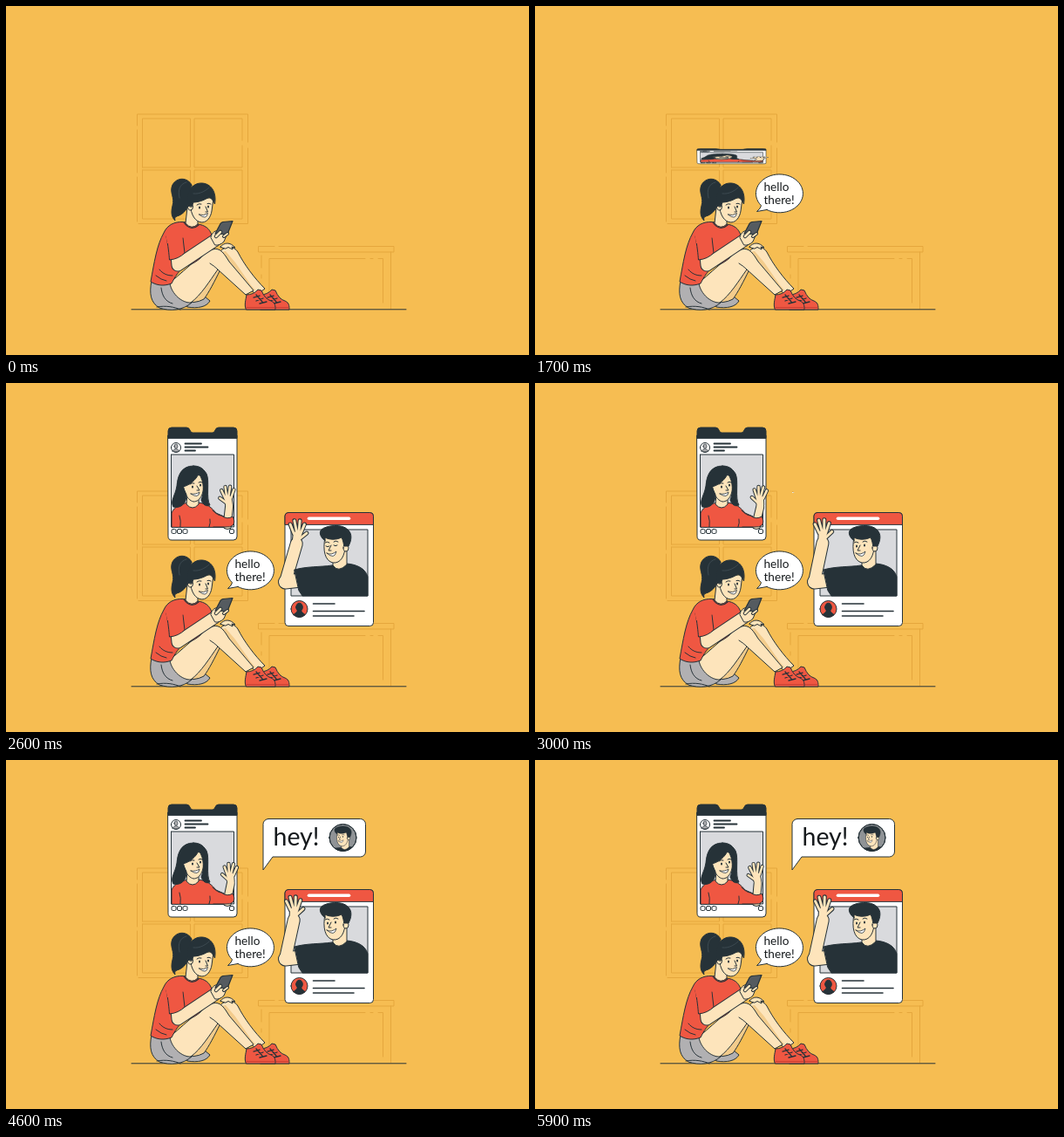
Recreate the animation shown at these times as an HTML page with a canvas. Size 600 by 400 pixels, loop 6000 ms.

```html
<!DOCTYPE html>
<html lang="en">
<head>
<meta charset="utf-8">
<title>Video chat</title>
<style>
  html, body { margin: 0; width: 100%; height: 100%; overflow: hidden; background: #f6bd52; }
  canvas { display: block; }
</style>
</head>
<body>
<canvas id="stage" width="600" height="400"></canvas>
<script>
const ctx = document.getElementById('stage').getContext('2d');
const BG = '#f6bd52', FAINT = '#e5a73d', INK = '#263238', RED = '#ef5742', DEEP_RED = '#cb3f33',
      SKIN = '#fde4bb', SHADE = '#f3cc8c', GREY = '#b1b0b2', PHOTO = '#d9dadd', WHITE = '#fff';
const LOOP = 6000, STEP = 100;
ctx.lineCap = ctx.lineJoin = 'round';

function line(d, color = INK, width = 1) {
  ctx.strokeStyle = color;
  ctx.lineWidth = width;
  ctx.stroke(new Path2D(d));
}

function shape(d, fill, stroke = INK, width = 1) {
  ctx.fillStyle = fill;
  ctx.fill(new Path2D(d));
  if (stroke) line(d, stroke, width);
}

const box = (x, y, w, h, r = 0) =>
  `M${x + r} ${y}h${w - 2 * r}a${r} ${r} 0 0 1 ${r} ${r}v${h - 2 * r}a${r} ${r} 0 0 1 ${-r} ${r}` +
  `h${2 * r - w}a${r} ${r} 0 0 1 ${-r} ${-r}v${2 * r - h}a${r} ${r} 0 0 1 ${r} ${-r}z`;
const oval = (x, y, rx, ry = rx) =>
  `M${x - rx} ${y}a${rx} ${ry} 0 1 1 ${2 * rx} 0a${rx} ${ry} 0 1 1 ${-2 * rx} 0z`;

function limb(d, width) {
  line(d, INK, width + 2);
  line(d, SKIN, width);
}

function text(str, x, y, size) {
  ctx.fillStyle = '#15191c';
  ctx.font = `${size}px Lato, sans-serif`;
  ctx.fillText(str, x, y);
}

function eye(x, y, closed) {
  if (closed) line(`M${x - 2} ${y}q2 1.6 4 0`);
  else shape(oval(x, y, 1, 1.5), INK, null);
}

// Draws a part scaled around a fixed point.
function scaled(x, y, sx, sy, draw) {
  if (sx <= 0 || sy <= 0) return;
  ctx.save();
  ctx.translate(x, y);
  ctx.scale(sx, sy);
  ctx.translate(-x, -y);
  draw();
  ctx.restore();
}

const FINGERS = 'M-3 -11L-7 -21M0 -13L-2.5 -25M2.5 -13L3.5 -25M4 -10L8.5 -21M3 -5L11 -11.5';

function wavingArm({ elbow: [x, y], shoulder, wrist: [wx, wy], width, size, flip, angle }) {
  for (const [color, rim] of [[INK, 2], [SKIN, 0]]) {
    line(`M${x} ${y}L${shoulder}`, color, width + rim);
    ctx.save();
    ctx.translate(x, y);
    ctx.rotate(angle);
    line(`M0 0L${wx} ${wy}`, color, width - 2 + rim);
    ctx.translate(wx, wy);
    ctx.scale(flip * size, size);
    line('M0 -3L.7 -9.500', color, 8.5 + rim);
    line(FINGERS, color, 2.8 + rim);
    ctx.restore();
  }
}

function room() {
  shape('M0 0H600V400H0z', BG, null);
  line('M150.5 137V124H277.5V156M277.5 163V249.5H222M216 249.5H152M150.5 247V196M150.5 191V142', FAINT);
  line('M156.5 185V129H211.5V185H156.5M271 160V185H216V129H271V154M156.5 188H211.5V244H156.5V188' +
       'M216 205V188H271V244H232M225 244H216V211', FAINT);
  line('M313 275.5H445V282H289.5V275.5H308M293 286V300M293 308V312M293 320V347M302 347V289.5H412' +
       'M418 289.5H421M427 289.5H432.5V340M441.5 282V347', FAINT);
  line('M144 347.8H459');
}

function shoe() {
  shape('M276 331Q284 331 289 325L293 326Q297 336 304 338C309 340 309 344 309 348H275.500' +
        'C273 343 275 337 276 331z', RED);
  line('M276 345.500H308', DEEP_RED);
  line('M284 334l7 -2M287 338l8 -3M291 341l8 -2M287 331l7 8', INK, 1.3);
}

function sitter(closed) {
  // legs, shorts and shoes
  shape('M209 341L228 333L234 338C230 345 220 347 208 345z', GREY);
  shape('M200 338L236 292L246 302C239 316 233 328 227 336Q216 342 205 338z', SHADE);
  shape('M246 281C252 274 262 275 266 282C273 296 285 312 297 324L287 331L256 302z', SKIN);
  shape('M247 282L252 281L263 294L281 320L287 327L280 324L255 294z', SHADE, null);
  ctx.save();
  ctx.translate(16, 0);
  shoe();
  ctx.restore();
  shape('M187 318C204 304 224 284 237 279C246 276 251 285 256 293L284 326L275 331L243 302' +
        'C233 316 224 331 212 340C204 345 192 343 186 334z', SKIN);
  line('M243 302C240 299 237 297 234 295');
  shoe();
  shape('M167 315C164 330 166 340 176 346C188 350 203 349 213 340C202 341 190 330 188 318z', GREY);
  line('M178 323C179 332 183 339 191 341M173 345C183 343 194 345 200 348');

  // body
  shape('M203 247.500C193 247 185 251 181 260C173 274 170 294 166 316C174 321 182 321 190 318' +
        'C194 310 198 303 207 298C220 294 230 284 232 276L236 263C234 255 228 251 220 250z', RED);
  shape('M208 280C218 281 228 276 233 270L230 281C222 289 213 293 203 294z', DEEP_RED, null);
  line('M176 302C180 307 185 309 191 309M172 309Q178 314 184 315');
  limb('M196 286L197 297L239 269', 13);
  shape('M184 264C186 275 187 284 187.500 291Q198 290 205 283L203 266', RED);
  shape('M183 261L202 261L202.500 272L185 272z', RED, null);

  // head
  shape('M213 205C208 196 196 196 191 205C187 214 194 219 191 229C189 237 190 242 194 246' +
        'C193 243 194 242 196 241C204 239 210 231 211 222z', INK);
  line('M207 202C199 204 197 211 199 220', '#46545b', .7);
  shape('M208 231L206 249Q213 257 220 250L220 240z', SKIN);
  line('M204 248Q212 259 221 251', INK, 1.2);
  shape('M211 222C211 236 215 245 222 247.500C230 250 235 242 236 235L238 220z', SKIN);
  shape(oval(211.5, 230, 3, 4), SKIN);
  shape('M209 229C206 214 213 203 224 203C235 203 242 213 239.500 227' +
        'C238 223 236 221 233 219C227 223 220 225 215 225L213 230z', INK);
  line('M215 215C223 216 230 211 233 208', '#46545b', .7);
  eye(222, 231, closed);
  eye(232, 230, closed);
  line('M219 228Q221 226 224 227M231 226.500Q233 225.500 235 227M229 230L231.500 236H229');
  shape('M221.500 239Q227 241 231.500 237.500Q230 246 221.500 239z', WHITE, INK, .8);

  // hands and handset
  shape('M246 276C250 271 257 270 263 277L259 276L260 279L255 276.500L252 278z', SKIN);
  shape('M235 265C236 259 241 257 245 257L254 258Q257 260 253 263L250 270Q245 275 240 274z', SKIN);
  shape('M240 261L246 249.500Q247 248 249 247.500L260 246.500L255 259Q254 261 252 261.500z', '#555b60', INK, 1.2);
  limb('M241 264L246 259', 2.5);
  limb('M250 264L254 261', 2);
}

function greeting() {
  shape('M266 233.500L254.500 235.500Q259 232 259.500 228.800A27 22 0 1 1 266 233.500z', WHITE);
  text('hello', 262.5, 212, 13.6);
  text('there!', 262.5, 227, 13.6);
}

function phoneCall(closed, wave) {
  shape('M186 60H265V176Q265 180 261 180H190Q186 180 186 176z', WHITE);
  shape('M186 63V55Q186 51 190 51H207Q210 51 211 54T214 57H237Q239 57 240 54T244 51H261Q265 51 265 55V63z', INK);
  shape(oval(195, 74, 5.5), WHITE);
  shape(oval(195, 72.5, 2, 2.6), GREY, INK, .7);
  shape('M191 78Q195 73 199 78Q195 80 191 78z', GREY, INK, .7);
  line('M205.500 69.500H224M205.500 73.500H231.500M205.500 77.500H217', INK, 1.8);
  shape(box(189.5, 82, 72, 83), PHOTO);
  for (const x of [190, 196.5, 203, 256.5]) shape(box(x, 167.5, 5, 5, 1.5), WHITE);

  shape('M190 165V149C193 141 202 139 208 137H220C231 138 236 143 241 149L250 153V165z', RED);
  line('M200 165Q201 158 199 152M233 165Q235 160 234 156');
  shape('M208 127L207 139Q214 147 221 139V130z', SKIN);
  shape('M203 106C202 122 207 134 215 136C223 136 228 127 228 106z', SKIN);
  shape('M215 95C201 95 197 106 196 118C194 130 188 135 192 142C200 144 207 139 207 128L203 119' +
        'C211 117 218 111 221 104C228 112 227 127 224 134C226 140 230 142 234 140' +
        'C229 132 234 112 230 104C226 97 221 95 215 95z', INK);
  eye(214, 119, closed);
  eye(223, 117, closed);
  line('M211 116Q213 114 216 115M221 114Q223 112.500 225 114M219 118L222 123H219');
  shape('M212 127Q218 128 222 125Q221 133 212 127z', WHITE, INK, .8);
  wavingArm({ elbow: [254, 160], shoulder: '254 162', wrist: [3, -18], width: 10,
              size: .92, flip: -1, angle: wave * .09 });
  shape('M237 146Q243 152 247 152Q254 157 260 153C264 160 261 165 254 165H238', RED);
}

function friend(closed) {
  shape('M331 214C345 210 360 211 374 209L391 207C402 208 412 212 415 222V244H340L336 238z', INK);
  shape('M375 200V209Q381 218 391 208V192z', SKIN);
  shape('M366 177C363 192 366 204 375 206C384 207 389 198 389 186L386 171z', SKIN);
  shape(oval(390, 189, 3, 4), SKIN);
  shape('M366 181C362 178 358 172 362 168C367 163 386 161 392 168C398 173 396 181 393 187' +
        'L388 187C387 184 387 181 385 177C379 180 371 180 366 177z', INK);
  eye(369, 187, closed);
  eye(378, 186, closed);
  line('M366 183Q368 181 371 183M376 182Q378 180 381 182M373 186L370 192H373');
  shape('M368 195Q373 198 379 193Q377 203 368 195z', WHITE, INK, .8);
}

function cardCall(closed, wave) {
  shape(box(320, 148.5, 101.5, 130, 4), WHITE);
  shape('M320 162V152.500Q320 148.500 324 148.500H417.500Q421.500 148.500 421.500 152.500V162z', RED);
  line('M347.500 155.300H393.500', WHITE, 3.6);
  shape(box(327, 168, 88, 76), PHOTO);
  shape(oval(336.5, 259, 9.5), RED);
  shape(oval(336.5, 257, 3.8, 4.8), INK);
  shape('M330 265.500Q334 263 335 260H338Q339 263 343 265.500Q336.500 271 330 265.500z', INK);
  line('M352.500 253H377M352.500 261.500H411M352.500 267H399', INK, 1.6);
  wavingArm({ elbow: [320.5, 228], shoulder: '338 226', wrist: [12.5, -44], width: 15,
              size: 1.05, flip: 1, angle: wave * .068 });
  friend(closed);
}

function reply(closed) {
  shape('M301 67.500H406.500a6 6 0 0 1 6 6V105a6 6 0 0 1 -6 6H306L295 126V73.500a6 6 0 0 1 6 -6z', WHITE);
  text('hey!', 306.5, 98, 28.5);
  const frame = oval(386.5, 89, 15.5);
  shape(frame, '#8f9396');
  ctx.save();
  ctx.clip(new Path2D(frame));
  ctx.translate(386.5, 89);
  ctx.scale(.54, .54);
  ctx.translate(-378, -188);
  friend(closed);
  ctx.restore();
  line(frame);
}

const progress = (t, start, end) => Math.min(1, Math.max(0, (t - start) / (end - start)));
const easeInOut = p => p < .5 ? 4 * p ** 3 : 1 - 4 * (1 - p) ** 3;
const easeBack = (p, s) => p && 1 + (s + 1) * (p - 1) ** 3 + s * (p - 1) ** 2;
const swing = (t, period, low) => -Math.cos((t - low) / period * 2 * Math.PI);
const blink = (t, start) => (t - start + LOOP * 17) % 1700 < 200;

function render(t) {
  room();
  sitter(blink(t, 3700));

  const hello = easeBack(progress(t, 800, 1400), 1.3);
  scaled(256, 236, hello, hello, greeting);

  scaled(225, 181, 1, easeInOut(progress(t, 1500, 2120)),
    () => phoneCall(blink(t, 1000), swing(t, 1700, 2350)));

  scaled(371, 213, 1, easeBack(progress(t, 2300, 2900), 1),
    () => cardCall(blink(t, 4300), swing(t, 1500, 3000)));

  const hey = easeInOut(progress(t, 2900, 3500));
  scaled(295, 126, hey, hey, () => reply(blink(t, 4000)));
}

function tick(now) {
  render(Math.floor(now % LOOP / STEP) * STEP);
  requestAnimationFrame(tick);
}
requestAnimationFrame(tick);
</script>
</body>
</html>
```
